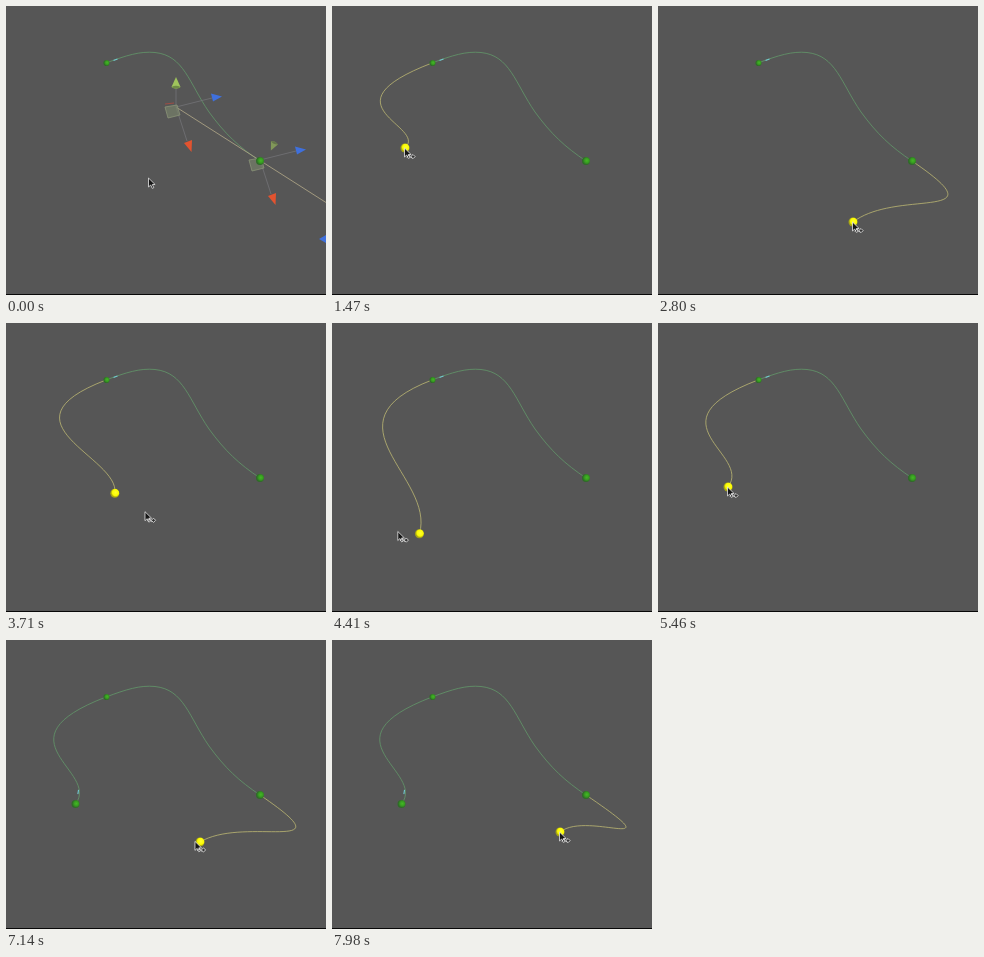
Animation, 320 px wide and 289 px high, one loop 8000 ms. Source, as an HTML page:

```html
<!DOCTYPE html>
<html lang="en">
<head>
<meta charset="utf-8">
<title>Extending a curve</title>
<style>
html, body { margin: 0; width: 100%; height: 100%; overflow: hidden; background: #565656; }
svg { display: block; width: 100vw; height: 100vh; }
.line { fill: none; stroke-width: 0.8; }
.green { stroke: #62996a; }
.yellow { stroke: #bdb873; }
.axis { stroke: #77777c; stroke-width: 0.7; }
.plane { fill: #76806a; fill-opacity: 0.7; stroke: #8b9478; stroke-width: 0.8; }
</style>
</head>
<body>
<svg viewBox="0 0 320 289" preserveAspectRatio="none">
  <defs>
    <radialGradient id="knot" cx="0.6" cy="0.45">
      <stop offset="0" stop-color="#44b825"/>
      <stop offset="0.55" stop-color="#379e20"/>
      <stop offset="1" stop-color="#2f6a28"/>
    </radialGradient>
    <radialGradient id="live" cx="0.58" cy="0.42">
      <stop offset="0" stop-color="#ffff30"/>
      <stop offset="0.7" stop-color="#fafa00"/>
      <stop offset="1" stop-color="#a5a315"/>
    </radialGradient>
    <g id="arrows">
      <path class="axis" d="M0 0L36 -9M0 0L11 34"/>
      <path d="M35 -13.5L46 -10.5L37 -5.5Z" fill="#3f70dc"/>
      <path d="M8 36L16 33L15.5 45Z" fill="#e2532f"/>
      <path class="plane" d="M-11 0L1 -2L4 8L-8 11Z"/>
    </g>
    <g id="cone">
      <path d="M0 -6L4.5 4Q0 7 -4.5 4Z" fill="#9fc45c"/>
      <path d="M-4.5 4Q0 1.5 4.5 4Q0 7 -4.5 4Z" fill="#6e8b45"/>
    </g>
  </defs>
  <rect width="320" height="289" fill="#565656"/>
  <rect y="288" width="320" height="1" fill="#080808"/>

  <path class="line green" d="M100 57C120 49.5 134 45 149 46.5C178 49.5 183 77 203 106C219 128 233 141 254 155"/>
  <path id="settled" class="line green"/>
  <path id="ext" class="line yellow"/>
  <path id="mark" d="M-2 .7L2 -.7" stroke="#72c9d1" stroke-width="1.1"/>

  <g id="gizmos">
    <path d="M170 101L320 196.5" fill="none" stroke="#aaa184" stroke-width="0.9"/>
    <path class="axis" d="M170 101V82"/>
    <use href="#arrows" x="170" y="101"/>
    <path d="M159 98L168 97" stroke="#a64c42" stroke-width="0.9"/>
    <use href="#cone" x="170" y="77"/>
    <use href="#arrows" x="254" y="154"/>
    <use href="#cone" transform="translate(267 140) rotate(205) scale(.85)" opacity="0.6"/>
    <path d="M313 233L320 229V237Z" fill="#3f70dc"/>
  </g>

  <circle cx="100.5" cy="57" r="3.1" fill="url(#knot)"/>
  <circle cx="254" cy="155" r="4" fill="url(#knot)"/>
  <circle id="placed" cx="69.5" cy="164" r="4" fill="url(#knot)"/>
  <circle id="node" r="4.5" fill="url(#live)"/>

  <g id="cursor">
    <path d="M0 0V9L2.2 7L3.8 10.4L5.3 9.7L3.8 6.5H6.6Z" fill="#161616" stroke="#e6e6e6" stroke-width="0.8"/>
    <g id="badge" fill="none" stroke="#eee" stroke-width="0.8">
      <path d="M2.5 9.5Q4.5 5.5 5.5 8.3T8 9"/>
      <path d="M8.5 6.5L10.6 8.6L8.5 10.7L6.4 8.6Z" fill="#333"/>
    </g>
  </g>
</svg>
<script>
const LOOP = 8000, STEP = 70;
const FADE = 560, SHOW_EXT = 840, COMMIT = 5600, RESUME = 6440;

// Turning points of the pointer: it arrives at one time and leaves at another.
const turns = [
  { arrive: 0, leave: 980, at: [143, 172] },
  { arrive: 1400, leave: 1680, at: [73, 142] },
  { arrive: 2030, leave: 2030, at: [48, 160] },
  { arrive: 2660, leave: 2800, at: [195, 216] },
  { arrive: 3220, leave: 3500, at: [75, 150] },
  { arrive: 3900, leave: 3900, at: [195, 222] },
  { arrive: 4620, leave: 4620, at: [33, 205] },
  { arrive: 5320, leave: 5600, at: [70, 164] },
  { arrive: 6720, leave: 7070, at: [194, 202] },
  { arrive: 7350, leave: 7350, at: [165, 198] },
  { arrive: 7910, leave: LOOP, at: [228, 192] }
];

// Each open end keeps its own handle; the far handle trails the free point.
const leftEnd = { start: [100, 57], handle: [-12, 100], bias: [60, 49] };
const rightEnd = { start: [254, 155], handle: [345, 217], bias: [142, 74] };

const el = id => document.getElementById(id);
const show = (id, on) => el(id).style.display = on ? "" : "none";
const place = (id, x, y, turn = 0) =>
  el(id).setAttribute("transform", `translate(${x} ${y}) rotate(${turn})`);
const distance = (a, b) => Math.hypot(a[0] - b[0], a[1] - b[1]);
const smooth = u => u * u * (3 - 2 * u);

function pointerAt(t) {
  const i = turns.findIndex(turn => t <= turn.leave);
  const to = turns[i], from = turns[i - 1];
  if (!from || t >= to.arrive) return to.at;
  const u = smooth((t - from.leave) / (to.arrive - from.leave));
  return to.at.map((v, axis) => from.at[axis] + (v - from.at[axis]) * u);
}

function extension({ start, handle, bias }, tip) {
  const far = tip.map((v, axis) => v / 2 + bias[axis]);
  return `M${start}C${handle} ${far} ${tip}`;
}

function draw(t) {
  const pointer = pointerAt(t), tip = pointerAt(t - STEP);
  const committed = t >= COMMIT;
  const active = t >= SHOW_EXT && (!committed || t >= RESUME);
  const nearLeft = distance(tip, leftEnd.start) < distance(tip, rightEnd.start);

  el("gizmos").style.opacity = Math.min(1, Math.max(0, 1 - (t - FADE + STEP) / (3 * STEP)));
  show("ext", active);
  show("node", active);
  show("placed", committed);
  show("settled", committed);
  show("badge", t >= SHOW_EXT);

  el("ext").setAttribute("d", extension(!committed && nearLeft ? leftEnd : rightEnd, tip));
  place("node", ...tip);
  place("cursor", pointer[0] - 0.5, pointer[1]);
  if (committed) place("mark", 72.2, 152, -62);
  else place("mark", 109.5, 53.7);
}

el("settled").setAttribute("d", extension(leftEnd, [69.5, 164]));

const origin = performance.now();
function tick() {
  const time = (performance.now() - origin) % LOOP;
  draw(Math.floor(time / STEP) * STEP);
  requestAnimationFrame(tick);
}
tick();
</script>
</body>
</html>
```
